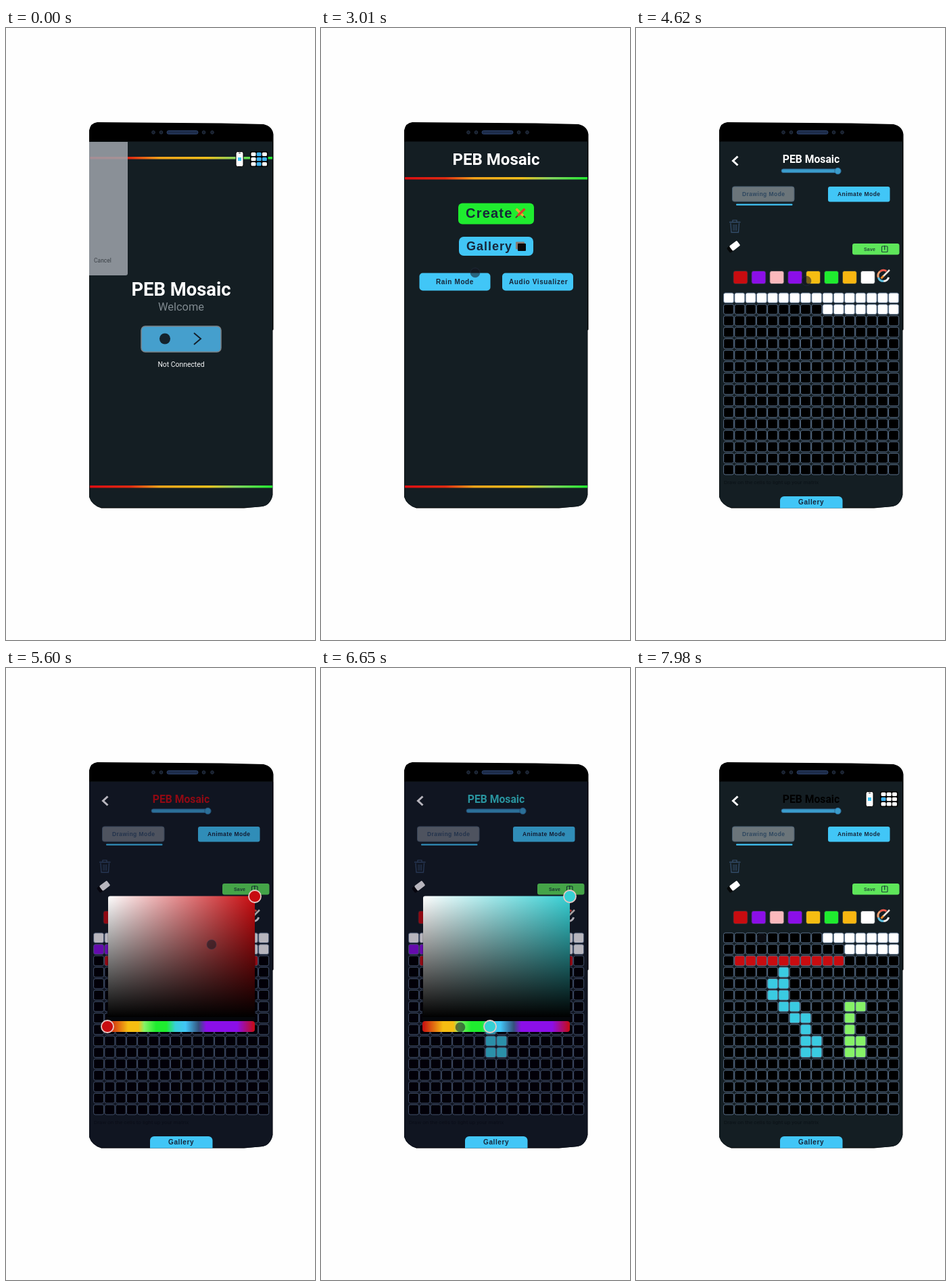
These frames come from a looping animation (457x903 px, 8 s). An HTML page with a canvas:

```html
<!DOCTYPE html>
<html lang="en">
<head>
<meta charset="utf-8">
<title>Pixel drawing app</title>
<style>
html, body { margin: 0; width: 100%; height: 100%; overflow: hidden; background: #fefefe; }
canvas { display: block; }
</style>
</head>
<body>
<canvas id="stage" width="457" height="903"></canvas>
<script>
const ctx = document.getElementById('stage').getContext('2d');
const LOOP = 8000, STEP = 70;
const NAME = 'PEB Mosaic';
const SCREEN = '#141e23', CYAN = '#41c6f7', GREEN = '#1fec2f', RED = '#c80c10';
const PURPLE = '#8b0fe8', YELLOW = '#f5bd12', INK = '#17263a';
const ROBOTO = 'Roboto, sans-serif', ARIAL = '"Liberation Sans", Arial, sans-serif';

// ---------- drawing helpers ----------
function box(x, y, w, h, r, fill, stroke, lineWidth = 1) {
  ctx.beginPath();
  ctx.roundRect(x, y, w, h, r);
  paint(fill, stroke, lineWidth);
}
function disc(x, y, r, fill, stroke, lineWidth = 1) {
  ctx.beginPath();
  ctx.arc(x, y, r, 0, 7);
  paint(fill, stroke, lineWidth);
}
function line(points, stroke, lineWidth) {
  ctx.beginPath();
  points.forEach(([x, y]) => ctx.lineTo(x, y));
  paint(null, stroke, lineWidth);
}
function paint(fill, stroke, lineWidth) {
  if (fill) { ctx.fillStyle = fill; ctx.fill(); }
  if (stroke) { ctx.strokeStyle = stroke; ctx.lineWidth = lineWidth; ctx.stroke(); }
}
function label(text, x, y, font, color, align = 'left', spacing = 0) {
  ctx.font = font;
  ctx.letterSpacing = spacing + 'px';
  ctx.textAlign = align;
  ctx.fillStyle = color;
  ctx.fillText(text, x, y);
}
function ramp(x0, y0, x1, y1, stops) {
  const g = ctx.createLinearGradient(x0, y0, x1, y1);
  stops.forEach(([at, color]) => g.addColorStop(at, color));
  return g;
}
function rotated(x, y, angle, draw) {
  ctx.save();
  ctx.translate(x, y);
  ctx.rotate(angle);
  draw();
  ctx.restore();
}
function rainbow(y) {
  box(124, y, 270, 3.5, 0, ramp(124, 0, 394, 0, [
    [0, '#dd0d12'], [.22, '#e02a12'], [.38, '#f3a31a'], [.64, '#f0c01c'], [.8, '#84d660'], [1, GREEN]]));
}

// ---------- colour of the hue bar ----------
const HUES = [[0, RED], [.14, YELLOW], [.21, YELLOW], [.25, '#86f267'], [.33, GREEN], [.4, GREEN],
  [.46, '#38cfd8'], [.53, CYAN], [.62, '#35507c'], [.67, PURPLE], [.88, PURPLE], [1, RED]];
const BAR = { x: 150, w: 218 };
const channels = hex => [1, 3, 5].map(i => parseInt(hex.slice(i, i + 2), 16));
function hueAt(x) {
  const p = (x - BAR.x) / BAR.w;
  const i = Math.max(1, HUES.findIndex(([at]) => at >= p));
  const [a, from] = HUES[i - 1], [b, to] = HUES[i];
  const end = channels(to), k = (p - a) / (b - a);
  return `rgb(${channels(from).map((v, n) => Math.round(v + (end[n] - v) * k))})`;
}

// ---------- timeline ----------
function track(keys, t) {
  const i = keys.findIndex(key => key[0] > t);
  if (i === 0) return keys[0].slice(1);
  if (i < 0) return keys[keys.length - 1].slice(1);
  const a = keys[i - 1], b = keys[i], k = (t - a[0]) / (b[0] - a[0]);
  return a.slice(1).map((v, n) => v + (b[n + 1] - v) * k);
}
const within = (t, spans) => spans.some(([from, to]) => t >= from && t < to);

const GRID = { x: 129, y: 390, dx: 16.27, dy: 16.9, n: 16 };
function run(row, from, to) {
  const step = Math.sign(to - from), cells = [];
  for (let c = from; c !== to + step; c += step) cells.push([c, row]);
  return cells;
}
const hueKeys = [[5740, 150], [5950, 250], [6650, 250], [6930, 205]];
const strokes = [
  { from: 3920, to: 4480, color: '#fff', cells: [...run(0, 0, 15), ...run(1, 15, 9)] },
  { from: 4760, to: 4970, color: PURPLE, cells: run(1, 8, 0) },
  { from: 5110, to: 5390, color: RED, cells: run(2, 1, 14) },
  { from: 6090, to: 6300, color: '#3acbe2', cells: [[5, 3], [5, 4], [4, 4], [4, 5], [5, 5], [5, 6], [6, 6],
    [6, 7], [7, 7], [7, 8], [7, 9], [8, 9], [8, 10], [7, 10]] },
  { from: 7210, to: 7490, color: '#86f267', cells: [[12, 6], [11, 6], [11, 7], [11, 8], [11, 9], [12, 9],
    [12, 10], [11, 10]] },
  { from: 7630, to: 7980, color: '#000', cells: [...run(2, 14, 11), ...run(1, 10, 0), ...run(0, 8, 0), ...run(0, 0, 3)] }
];
const cellTime = (s, i) => s.from + (s.to - s.from) * i / (s.cells.length - 1);
const pointerKeys = [
  [910, 272, 376], [1120, 297, 317], [1260, 271, 272], [1400, 264, 273], [1540, 226, 333], [1820, 213, 383],
  [3010, 228, 361], [3220, 287, 302], [3360, 285, 280], [3640, 279, 277],
  [4620, 252, 373], [4690, 236, 368], [5040, 155, 368], [5460, 366, 365], [5600, 304, 408],
  [5740, 150, 529], [5950, 250, 529], [6370, 366, 365], [6650, 206, 530], [6930, 205, 529],
  [7140, 330, 590], [7560, 145, 323],
  ...strokes.flatMap(s => s.cells.map(([c, r], i) =>
    [cellTime(s, i), GRID.x + GRID.dx * c + 8, GRID.y + GRID.dy * r + 9]))
].sort((a, b) => a[0] - b[0]);
const pointerShown = [[910, 1960], [3010, 3640], [3780, LOOP]];
const pickerShown = [[5460, 6020], [6440, 7140]];
const sending = [[0, 560], ...strokes.map(s => [s.from, s.to + 1])];

function brush(t) {
  if (t < 4690) return '#fff';
  if (t < 5040) return PURPLE;
  if (t < 5740) return RED;
  return t < 7560 ? hueAt(track(hueKeys, t)[0]) : '#000';
}

// ---------- parts ----------
function phoneBody() {
  ctx.beginPath();
  ctx.moveTo(123, 151);
  ctx.quadraticCurveTo(125, 140, 135, 139);
  ctx.lineTo(318, 140.5);
  ctx.lineTo(381, 142);
  ctx.quadraticCurveTo(394, 145, 395.5, 157);
  ctx.lineTo(395.5, 445);
  ctx.lineTo(394.5, 446);
  ctx.lineTo(394.5, 689);
  ctx.quadraticCurveTo(391, 704, 379, 706);
  ctx.lineTo(352, 708.5);
  ctx.lineTo(141, 708.5);
  ctx.quadraticCurveTo(127, 704, 123, 692);
  ctx.closePath();
}
function bezel() {
  box(238, 151.5, 46, 5, 2.5, '#1d2c4a', '#2b4068');
  [218, 229.5, 292.5, 305].forEach(x => disc(x, 154, 2.3, '#151c28', '#273448'));
}
function linkIcons(t) {
  box(340, 182.5, 11, 22, 2.5, '#fff', '#000');
  box(343, 191, 5, 5, 0, CYAN);
  box(344, 184, 3, 1, 0, '#333');
  const lit = [[1, 4, 5, 7], [0, 4], [3], [2, 4, 6]][t / STEP % 4];
  box(361, 182, 26.5, 23, 3, '#000');
  for (let i = 0; i < 9; i++)
    box(362.5 + i % 3 * 8.2, 183.5 + Math.floor(i / 3) * 7.2, 7, 5.6, 1.5, lit.includes(i) ? '#3fb0ec' : '#fff');
}
function welcome(t) {
  rainbow(190);
  rainbow(675);
  if (t < 140) {
    box(123, 168, 57, 197, [0, 0, 3, 0], 'rgba(158,163,171,.86)');
    label('Cancel', 130, 346, '8.5px ' + ROBOTO, '#3c4248');
  }
  label(NAME, 259, 395, 'bold 27.4px ' + ROBOTO, '#fff', 'center');
  label('Welcome', 259, 416.5, '16.4px ' + ROBOTO, '#7f898f', 'center');
  box(200, 440, 118, 38, 6, '#459fcd', '#7a8288', 1.5);
  disc(235, 458.5, 8, '#14222d');
  line([[278, 450], [288, 458.5], [278, 467]], '#14222d', 2);
  label(t < 280 ? 'Not Connected' : 'Connected', 259, 500, '10.4px ' + ROBOTO, '#f4f6f7', 'center');
}
function home() {
  label(NAME, 259, 201.5, 'bold 24px ' + ROBOTO, '#fff', 'center');
  rainbow(220);
  rainbow(675);
  box(203, 258.5, 112, 31, 6, GREEN);
  label('Create', 214, 280, 'bold 20px ' + ARIAL, INK, 'left', 1.2);
  [[-1, '#f2a32b'], [1, '#d8402c']].forEach(([side, color]) => rotated(295, 273, side * .8, () => {
    box(-1.8, -9, 3.6, 15, 1, color);
    line([[0, 6], [0, 10]], '#5a3a24', 2);
  }));
  box(204, 308, 110, 28, 7, CYAN);
  label('Gallery', 215, 328, 'bold 18px ' + ARIAL, INK, 'left', 1);
  box(288, 315.5, 13, 11, 1, '#8a7a70');
  box(291, 318, 12, 11, 1, '#07090c');
  box(145.5, 361.5, 105, 26, 5, CYAN);
  label('Rain Mode', 170, 377.5, 'bold 10px ' + ARIAL, INK, 'left', .6);
  box(268, 361.5, 105, 26, 5, CYAN);
  label('Audio Visualizer', 278, 377.5, 'bold 10px ' + ARIAL, INK, 'left', .6);
}
function toolbar(t) {
  line([[150.5, 189.5], [143.5, 196], [150.5, 202.5]], '#fff', 3);
  label(NAME, 259, 199, 'bold 15.7px ' + ROBOTO, brush(t), 'center');
  box(215, 208, 86, 5.5, 2.7, '#3a9ccb', '#2d5f86');
  disc(298.5, 211, 4.6, '#3a9ccb', '#2d6f9c');

  box(142.5, 234, 91.5, 22, 3, '#6b757a', '#4a5f70');
  label('Drawing Mode', 157, 248, 'bold 8.5px ' + ARIAL, '#2f4860', 'left', .45);
  box(148, 259.5, 83.5, 2.2, 1, CYAN);
  box(284, 234, 91.5, 22.5, 3, CYAN);
  label('Animate Mode', 298, 248, 'bold 8.5px ' + ARIAL, INK, 'left', .45);

  const trash = '#344e6c';
  line([[138, 286.5], [154.5, 286.5]], trash, 1.5);
  line([[143, 286], [143, 283.5], [149, 283.5], [149, 286]], trash, 1.2);
  line([[140, 288], [141, 301.5], [151.5, 301.5], [152.5, 288]], trash, 1.3);
  [144, 146.3, 148.6].forEach(x => line([[x, 290], [x, 299]], trash, 1));

  rotated(144.5, 322.5, -.65, () => {
    box(-10, -4.5, 8, 9, 2, '#050708');
    box(-5, -4.5, 14, 9, 1.5, '#fff');
  });
  box(320, 318, 69.5, 16.5, 3, '#5ee65a');
  label('Save', 337, 329, 'bold 7px ' + ARIAL, '#24503a', 'left', .2);
  box(363.5, 322, 8.5, 8.5, 1, null, '#1d4a38', 1.2);
  line([[367.7, 321], [367.7, 327.5]], '#1d4a38', 1.3);

  [RED, PURPLE, '#fbb9bd', PURPLE, YELLOW, GREEN, '#f9b611', '#fff'].forEach((color, i) =>
    box(144 + i * 26.9, 358.5, 21, 19, 3, color, '#2a3338', .8));
  ['#e8584a', '#f0a070', '#5fc0e0', '#f2f2f2'].forEach((color, i) => {
    ctx.beginPath();
    ctx.arc(366, 365.5, 8, 5.3 - i * 1.25, 4.05 - i * 1.25, true);
    paint(null, color, 3);
  });
  line([[365, 367], [375, 357]], '#e9e2da', 2.5);
  line([[362.5, 369.5], [366, 366]], '#e88a30', 3);
}
function matrix(t) {
  const colors = {};
  strokes.forEach(s => s.cells.forEach(([c, r], i) => {
    if (cellTime(s, i) <= t) colors[c + ',' + r] = s.color;
  }));
  for (let r = 0; r < GRID.n; r++)
    for (let c = 0; c < GRID.n; c++)
      box(GRID.x + .6 + c * GRID.dx, GRID.y + .9 + r * GRID.dy, 15, 14.6, 2.5, colors[c + ',' + r] || '#000', '#586e88');
}
function picker(t) {
  const handle = track(hueKeys, t)[0], hue = hueAt(handle);
  box(123, 168, 273, 541, 0, 'rgba(8,0,28,.29)');
  box(150, 500, 218, 22, 0, '#04060a');
  box(151, 336.5, 217, 178, [3, 3, 0, 0], ramp(151, 0, 368, 0, [[0, '#fff'], [1, hue]]));
  box(150.5, 336, 218, 179, [3, 3, 0, 0], ramp(0, 336, 0, 515, [[0, 'rgba(0,0,0,0)'], [1, '#000']]));
  box(BAR.x, 521, BAR.w, 16, 4, ramp(BAR.x, 0, BAR.x + BAR.w, 0, HUES));
  disc(368, 337, 9, hue, '#e8c8c4', 1.8);
  disc(handle, 529, 9, hue, '#e8c8c4', 1.8);
}
function editor(t) {
  toolbar(t);
  matrix(t);
  label('Draw on the cells to light up your matrix', 130, 673, '8px ' + ROBOTO, '#0b1217');
  if (within(t, pickerShown)) picker(t);
  box(213, 691, 92.5, 18, [6, 6, 0, 0], CYAN);
  label('Gallery', 240, 702.5, 'bold 10px ' + ARIAL, INK, 'left', .6);
}

function render(now) {
  const t = Math.floor(now % LOOP / STEP) * STEP;
  ctx.fillStyle = '#fefefe';
  ctx.fillRect(0, 0, 457, 903);
  ctx.save();
  phoneBody();
  paint('#000');
  ctx.clip();
  box(123.5, 167.5, 270.5, 540, 0, SCREEN);
  bezel();
  if (t < 700) welcome(t);
  else if (t < 3780) home();
  else editor(t);
  if (within(t, sending)) linkIcons(t);
  if (within(t, pointerShown)) {
    const [x, y] = track(pointerKeys, t);
    disc(x, y, 7, 'rgba(20,22,32,.55)', 'rgba(45,60,85,.4)');
  }
  ctx.restore();
}

const start = performance.now();
function tick() {
  render(performance.now() - start);
  requestAnimationFrame(tick);
}
tick();
</script>
</body>
</html>
```
